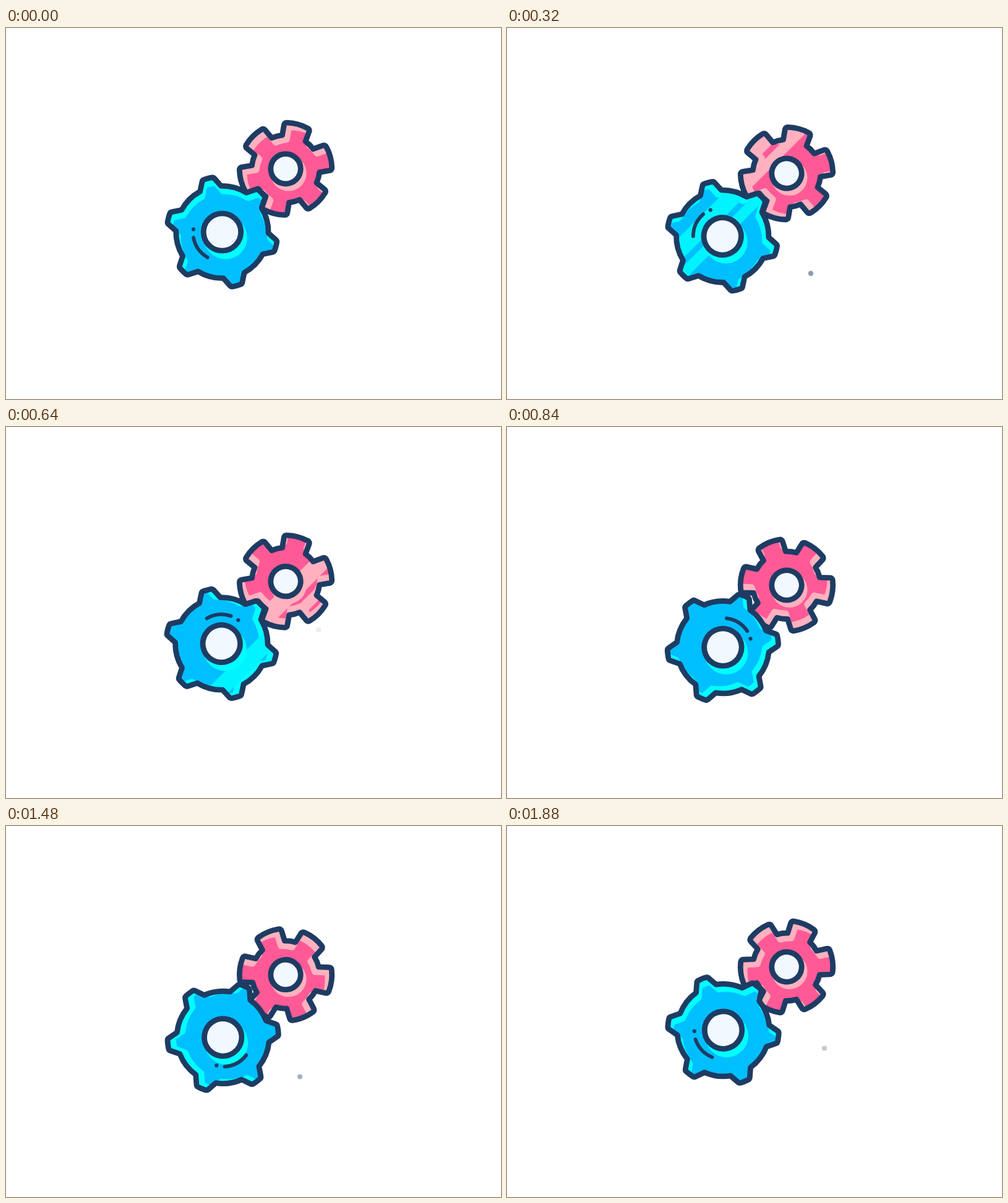
Write an HTML page with a canvas that moves like this. It is 800 px wide and 600 px high and loops after 1.92 s.

```html
<!DOCTYPE html>
<html lang="en">
<head>
<meta charset="utf-8">
<title>Gears</title>
<style>
  html, body { margin: 0; width: 100%; height: 100%; overflow: hidden; background: #fff; }
  canvas { display: block; }
</style>
</head>
<body>
<canvas id="stage" width="800" height="600"></canvas>
<script>
const ctx = document.getElementById('stage').getContext('2d');
const LOOP = 1920, STEP = 40, TAU = Math.PI * 2, LINE = 8.8;
const NAVY = '#1e3c63', HUB = '#f2f8ff';
const rad = deg => deg * Math.PI / 180;
const polar = (r, deg) => [r * Math.cos(rad(deg)), r * Math.sin(rad(deg))];

// Six teeth with rounded corners: tip and root are [radius, half angle] from the tooth axis.
function gearPath(first, [tipR, tipA], [rootR, rootA]) {
  const path = new Path2D(), round = 4, ease = 3.3;
  path.moveTo(...polar(rootR, first - rootA));
  for (let i = 0; i < 6; i++) {
    const mid = first + i * 60;
    path.arcTo(...polar(tipR, mid - tipA), ...polar(tipR, mid - tipA + ease), round);
    path.arc(0, 0, tipR, rad(mid - tipA + ease), rad(mid + tipA - ease));
    path.arcTo(...polar(tipR, mid + tipA), ...polar(rootR, mid + rootA), round);
    path.arc(0, 0, rootR, rad(mid + rootA), rad(mid + 60 - rootA));
  }
  path.closePath();
  return path;
}

// rim: direction and length of the light edge, and its inset
const pink = {
  path: gearPath(-75, [74.7, 16.6], [54.8, 20.8]),
  fill: '#ff5a96', light: '#ffb1bf', shine: '#ffb1bf',
  hub: 24.2, shade: [4.5, 7, 29], rim: [-135, 9.5, 5.5], spin: -1, shineLag: -41
};
const blue = {
  path: gearPath(15, [89.8, 5.8], [74.7, 13.6]),
  fill: '#00bfff', light: '#00ffff', shine: '#00f3ff',
  hub: 30.2, shade: [5.5, 9, 35], rim: [-110, 9, 5], spin: 1, shineLag: 0, glint: true
};

function disc(x, y, r, color) {
  ctx.fillStyle = color;
  ctx.beginPath();
  ctx.arc(x, y, r, 0, TAU);
  ctx.fill();
}

function drawShine(gear, t) {
  if (t >= 800) return;
  const start = 485 + 0.4125 * t + gear.shineLag;
  ctx.save();
  ctx.rotate(Math.PI / 4);
  ctx.fillStyle = gear.shine;
  for (const [from, width] of [[0, 40], [53, 24]]) {
    ctx.fillRect((start + from) / Math.SQRT2, -900, width / Math.SQRT2, 1800);
  }
  ctx.restore();
}

function drawBody(gear) {
  const [angle, shift, inset] = gear.rim;
  ctx.fillStyle = ctx.strokeStyle = gear.light;
  ctx.fill(gear.path);
  ctx.save();
  ctx.translate(...polar(-shift, angle));
  ctx.fillStyle = gear.fill;
  ctx.fill(gear.path);
  ctx.lineWidth = inset * 2;
  ctx.stroke(gear.path);
  ctx.restore();
}

function drawGear(gear, x, y, t) {
  const turn = gear.spin * TAU * t / LOOP;

  ctx.save();
  ctx.translate(x, y);
  ctx.rotate(turn);
  ctx.clip(gear.path);
  drawBody(gear);
  ctx.rotate(-turn);
  ctx.translate(-x, -y);
  drawShine(gear, t);
  ctx.restore();

  ctx.save();
  ctx.translate(x, y);
  const [sx, sy, sr] = gear.shade;
  disc(sx, sy, sr, gear.light);
  ctx.rotate(turn);
  ctx.strokeStyle = NAVY;
  if (gear.glint) {
    ctx.lineWidth = 5.8;
    ctx.beginPath();
    ctx.arc(0, 0, 47.3, rad(120), rad(169));
    ctx.stroke();
    disc(...polar(46.7, 185.4), 3.1, NAVY);
  }
  ctx.lineWidth = LINE;
  ctx.stroke(gear.path);
  disc(0, 0, gear.hub, HUB);
  ctx.stroke();
  ctx.restore();
}

const sparks = [
  { begin: 220, end: 660, fadeIn: 200, fadeOut: 210, x: 486.6, y: 418.5, vx: 0.044, vy: -0.2155 },
  { begin: 1400, end: 1920, fadeIn: 200, fadeOut: 150, x: 467.4, y: 414.7, vx: 0.095, vy: -0.115 }
];

function drawSpark(s, t) {
  if (t <= s.begin || t >= s.end) return;
  const age = t - s.begin;
  ctx.globalAlpha = Math.min(1, age / s.fadeIn, (s.end - t) / s.fadeOut);
  disc(s.x + s.vx * age, s.y + s.vy * age, 4.1, NAVY);
  ctx.globalAlpha = 1;
}

function draw(t) {
  const phase = TAU * t / LOOP, bob = Math.cos(phase);
  ctx.fillStyle = '#fff';
  ctx.fillRect(0, 0, 800, 600);
  ctx.lineJoin = ctx.lineCap = 'round';
  drawGear(pink, 452, 242.4 - 14.6 * bob, t);
  drawGear(blue, 349.4 - 1.3 * Math.sin(phase), 343.6 - 13.6 * bob, t);
  for (const s of sparks) drawSpark(s, t);
}

const origin = performance.now();
function tick() {
  const elapsed = (performance.now() - origin) % LOOP;
  draw(Math.floor(elapsed / STEP) * STEP);
  requestAnimationFrame(tick);
}
tick();
</script>
</body>
</html>
```
